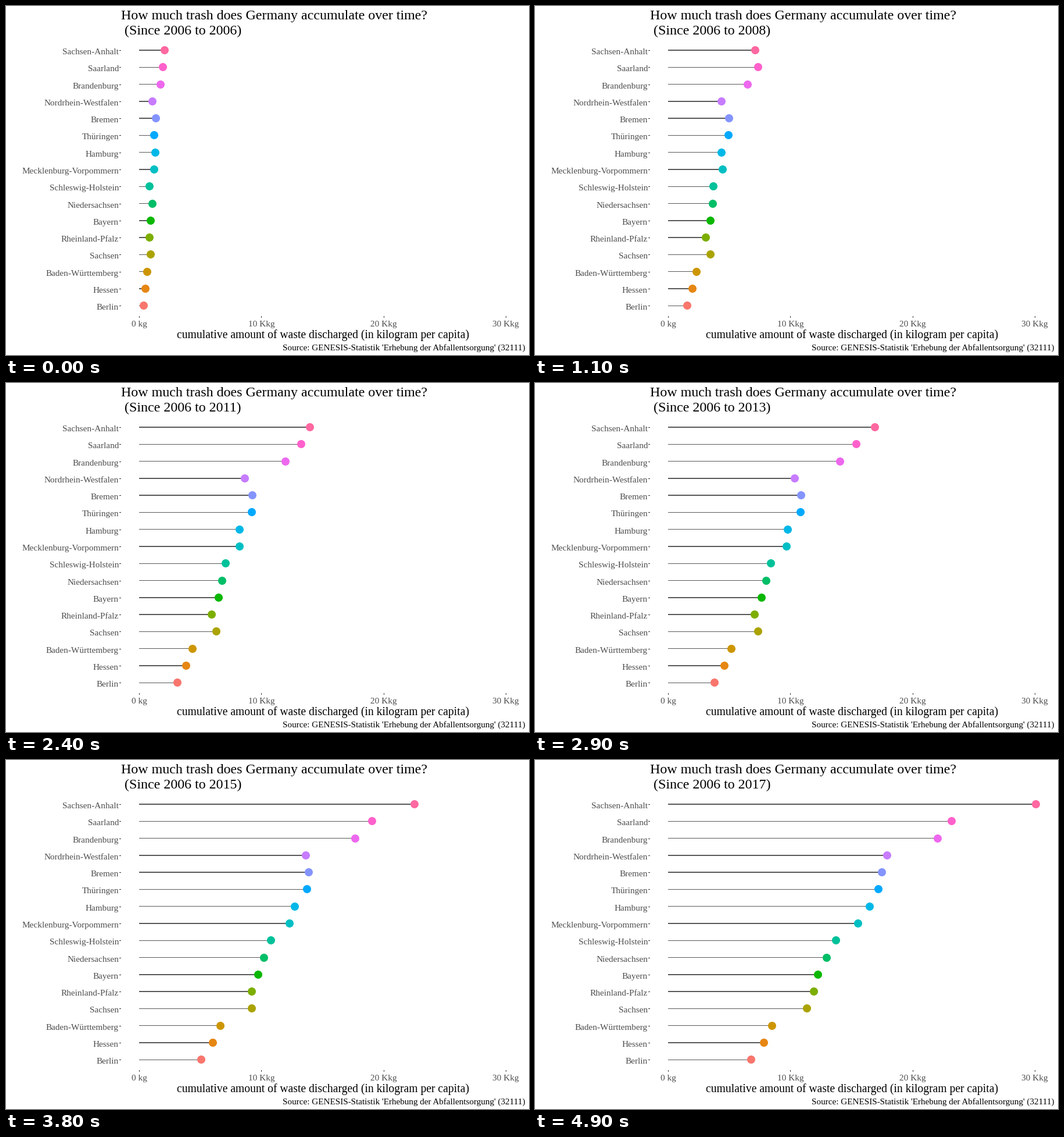
Write a matplotlib script that moves like this. It is 900x600 px and loops after 10000 ms.

```python
import math

import matplotlib.pyplot as plt
from matplotlib.animation import FuncAnimation
from matplotlib.patches import Circle, Rectangle

W, H = 900, 600
STEPS = 49          # moving steps, then the chart rests
FRAMES, INTERVAL = 100, 100
X0, X_10K = 229, 210.3
Y0, ROW = 75.95, 29.295
PANEL_LEFT, PANEL_BOTTOM, TICK = 198, 533, 3
STEM = 1.42
GREY_TEXT, GREY_LINE, GREY_TICK = "#4d4d4d", "#595959", "#333333"

# State: first and last dot position, and how far the path bows between them
STATES = {
    "Sachsen-Anhalt": (273, 862, -153),
    "Saarland": (270, 717, 76),
    "Brandenburg": (266, 693, 25),
    "Nordrhein-Westfalen": (252, 606, -59),
    "Bremen": (258, 597, -2),
    "Thüringen": (255, 591, 13),
    "Hamburg": (257, 576, -45),
    "Mecklenburg-Vorpommern": (255, 556, 0),
    "Schleswig-Holstein": (247, 518, -7),
    "Niedersachsen": (252, 502, -10),
    "Bayern": (249, 487, 0),
    "Rheinland-Pfalz": (247, 480, -28),
    "Sachsen": (249, 468, 22),
    "Baden-Württemberg": (243, 408, -11),
    "Hessen": (240, 394, -20),
    "Berlin": (237, 372, -33),
}

plt.rcParams["font.family"] = "Liberation Serif"
fig = plt.figure(figsize=(W / 72, H / 72), dpi=72, facecolor="white")
ax = fig.add_axes([0, 0, 1, 1])
ax.set_xlim(0, W)
ax.set_ylim(H, 0)
ax.axis("off")


def hue_color(hue, chroma=100, light=65):
    """Polar LUV colour, clipped to sRGB."""
    a = math.radians(hue)
    y = ((light + 16) / 116) ** 3
    u = chroma * math.cos(a) / (13 * light) + 0.1978
    v = chroma * math.sin(a) / (13 * light) + 0.4683
    x = 9 * y * u / (4 * v)
    z = y * (12 - 3 * u - 20 * v) / (4 * v)
    linear = (3.2405 * x - 1.5371 * y - 0.4985 * z,
              -0.9693 * x + 1.8760 * y + 0.0416 * z,
              0.0556 * x - 0.2040 * y + 1.0572 * z)

    def gamma(c):
        c = min(max(c, 0), 1)
        return 12.92 * c if c <= 0.00304 else 1.055 * c ** (1 / 2.4) - 0.055

    return tuple(min(gamma(c), 1) for c in linear)


def text(x, y, s, size, color="black", ha="left"):
    return ax.text(x, y, s, fontsize=size, color=color, ha=ha, va="baseline")


def bar(x, y, w, h, color):
    return ax.add_patch(Rectangle((x, y), w, h, facecolor=color, lw=0))


def dot_x(first, last, bow, t):
    return round(first + (last - first) * t + bow * t * (1 - t))


text(198, 23, "How much trash does Germany accumulate over time?", 24)
subtitle = text(204, 49, "", 24)
text(545.5, 571, "cumulative amount of waste discharged (in kilogram per capita)",
     19.65, ha="center")
text(894, 592,
     "Source: GENESIS-Statistik 'Erhebung der Abfallentsorgung' (32111)",
     15.07, ha="right")

for k, label in enumerate(["0 kg", "10 Kkg", "20 Kkg", "30 Kkg"]):
    x = X0 + X_10K * k
    text(x, 551, label, 15.3, GREY_TEXT, "center")
    bar(round(x), PANEL_BOTTOM, 1, TICK, GREY_TICK)

stems, dots = [], []
for i, (name, path) in enumerate(STATES.items()):
    y = Y0 + ROW * i
    row = round(y)
    top, bottom = round(y - STEM / 2), round(y + STEM / 2)
    color = hue_color(15 + 360 * (len(STATES) - 1 - i) / len(STATES))
    text(194, row + 7, name, 15.2, GREY_TEXT, "right")
    bar(PANEL_LEFT - TICK, row, TICK, 1, GREY_TICK)
    stems.append(bar(X0, top, path[0] - X0, bottom - top, GREY_LINE))
    dots.append(ax.add_patch(Circle((path[0], row), 7, facecolor=color,
                                    lw=0, zorder=2)))


def update(n):
    t = min(n / STEPS, 1)
    subtitle.set_text(f"(Since 2006 to {2006 + int(11 * t + 0.5)})")
    for path, stem, dot in zip(STATES.values(), stems, dots):
        x = dot_x(*path, t)
        stem.set_width(x - X0)
        dot.center = (x, dot.center[1])
    return [subtitle, *stems, *dots]


anim = FuncAnimation(fig, update, frames=FRAMES, interval=INTERVAL,
                     init_func=lambda: update(0), repeat=True, repeat_delay=0)
plt.show()
```
